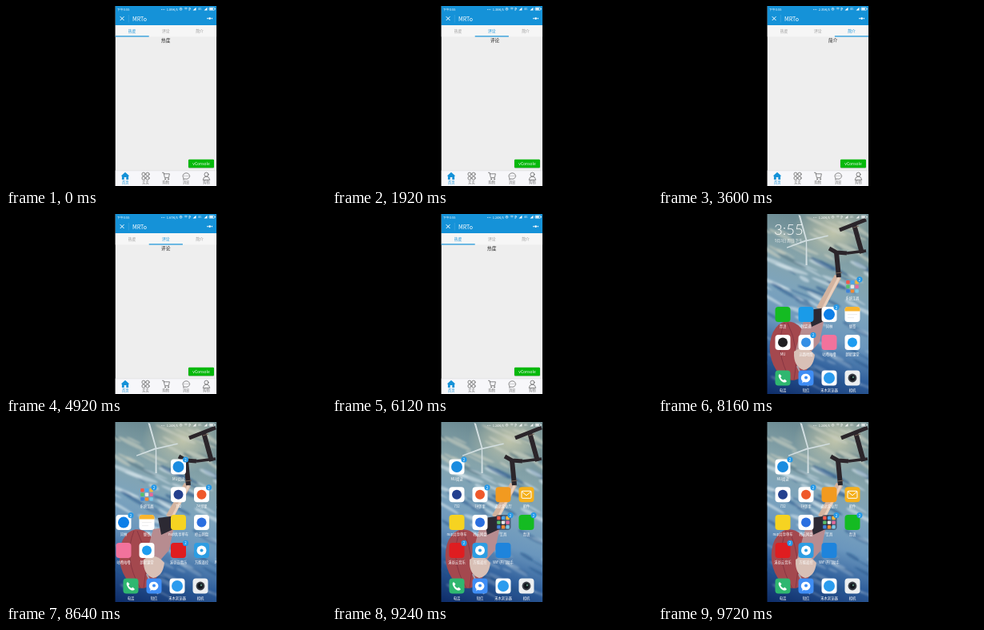
An HTML page that plays this animation: 400x225 px, repeating every 9.84 s.

```html
<!DOCTYPE html>
<html lang="zh">
<head>
<meta charset="utf-8">
<title>Tab swipe demo</title>
<style>
  html, body { margin: 0; width: 100%; height: 100%; overflow: hidden; background: #000; }
  svg { display: block; width: 100vw; height: 100vh; }
  text {
    font-family: "Noto Sans CJK SC", "Noto Sans CJK", "Noto Sans", sans-serif;
    text-anchor: middle; dominant-baseline: central;
  }
  .left { text-anchor: start; }
  .right { text-anchor: end; }
  .tab { font-size: 4.8px; fill: #999; }
  .tab.on, .nav.on { fill: #1592d8; }
  .nav { font-size: 4.2px; fill: #777; }
  .label { font-size: 4.3px; fill: #fff; }
  .line { fill: none; stroke: #555; stroke-width: .7; stroke-linejoin: round; stroke-linecap: round; }
</style>
</head>
<body>
<svg viewBox="0 0 400 225">
  <defs>
    <clipPath id="phone"><rect x="136.5" width="126.7" height="225"/></clipPath>
    <linearGradient id="sky" x1=".2" y1="0" x2="0" y2="1">
      <stop offset="0" stop-color="#6d8c94"/>
      <stop offset=".2" stop-color="#86a4ab"/>
      <stop offset=".4" stop-color="#7da4bd"/>
      <stop offset=".58" stop-color="#6a96bd"/>
      <stop offset=".76" stop-color="#2f5f9c"/>
      <stop offset="1" stop-color="#0c2a66"/>
    </linearGradient>
    <radialGradient id="glow">
      <stop offset="0" stop-color="#ded9b4"/>
      <stop offset="1" stop-color="#ded9b4" stop-opacity="0"/>
    </radialGradient>
    <filter id="soft" x="-30%" y="-30%" width="160%" height="160%"><feGaussianBlur stdDeviation="1"/></filter>
    <g id="status" fill="#fff">
      <path d="M194 4.4h5" stroke="#fff" stroke-width=".7" stroke-dasharray="1 .7"/>
      <g fill="none" stroke="#fff" stroke-width=".6">
        <circle cx="218.5" cy="3.8" r="1.5"/><path d="M218.5 2.8v1.1h.8M222.8 3q2-1.500 4 0M223.700 4.100q1.100-.8 2.200 0M229 2v3.600l2-2.600-2-.6"/>
        <rect x="254" y="2" width="6.6" height="3.3" rx=".6"/>
      </g>
      <path d="M233.5 5.6l4-3.800v3.800zM247.500 5.600l4-3.800v3.800zM254.600 2.600h4.200v2.100h-4.200zM261 3h.8v1.300h-.8z"/>
      <text x="242.3" y="3.8" font-size="3.6">4G</text>
    </g>
  </defs>

  <rect width="400" height="225" fill="#000"/>
  <g clip-path="url(#phone)">
    <g id="home">
      <g id="wall">
        <rect x="130" width="140" height="225" fill="url(#sky)"/>
        <ellipse cx="222" cy="22" rx="52" ry="42" fill="url(#glow)" opacity=".75"/>
        <g id="clouds" filter="url(#soft)"></g>
        <path d="M186.500 64l.4-30h1.200l.6 30zM187 34l-9.500-33 2.500 1 8.600 31.600zM187.500 32.500l27-6 .3 1.300-27 6.500zM187.300 34.200l-24 8.600-.4-1.200 24-9.400z" fill="#d3dfe2"/>
        <ellipse cx="167" cy="171" rx="25" ry="37" fill="#a4484e" transform="rotate(-8 167 171)"/>
        <path d="M160 136q-14 34 8 72M164 136q16 32 8 72" fill="none" stroke="#81323f" stroke-width=".8"/>
        <path d="M204 119L227 78" stroke="#d3b39f" stroke-width="9"/>
        <path d="M209 117L228 80" stroke="#ead0bd" stroke-width="3"/>
        <path d="M184 134l26-4-6 30-14 16-16-6z" fill="#b78c90"/>
        <path d="M190 120l23-3 5 13-24 11z" fill="#2c2933"/>
        <path d="M172 172q14-10 26 4-2 17-14 19-13-4-12-23z" fill="#d8c0b6"/>
        <path d="M176 190q5 12 14 25" fill="none" stroke="#a7a3ae" stroke-width="2"/>
        <g fill="none" stroke="#2b252a" stroke-linejoin="round">
          <path d="M247 13l10 36M225 48l3 31" stroke-width="6"/>
          <path d="M229 20l33-13M216 43l9 5 13 1" stroke-width="5"/>
          <path d="M238 49l24-3" stroke-width="3.500"/>
          <path d="M246 17l7-2M224 74l8-1" stroke="#796558"/>
        </g>
      </g>
      <use href="#status" opacity=".85"/>
      <text class="right" x="214.5" y="3.8" font-size="4" fill="#fff">1.24K/s</text>
      <g id="pages">
        <text class="left" x="145" y="19" font-size="18.5" fill="#fff" style="font-family:Lato,sans-serif;font-weight:300">3:55</text>
        <text class="left" x="146" y="33" font-size="4.6" fill="#fff" opacity=".85">9月3日 周日 下午</text>
      </g>
      <g id="dock"></g>
    </g>

    <g id="app">
      <rect x="136.5" width="126.7" height="225" fill="#eee"/>
      <g id="slides" font-size="5.7" fill="#222"></g>
      <rect x="136.5" width="126.7" height="24" fill="#1592d8"/>
      <use href="#status"/>
      <text class="left" x="139" y="3.8" font-size="3.9" fill="#fff">下午3:55</text>
      <text id="speed" class="right" x="214.5" y="3.8" font-size="4" fill="#fff"></text>
      <path d="M142.7 13.2l4.8 4.8m0-4.800l-4.800 4.800" stroke="#fff"/>
      <path d="M153.3 11v9.5" stroke="#4babdf" stroke-width=".6"/>
      <text class="left" x="158" y="15.5" font-size="7" fill="#fff">MRTo</text>
      <g fill="#fff"><circle cx="252" cy="15.6" r=".8"/><circle cx="254.7" cy="15.6" r="1.4"/><circle cx="257.4" cy="15.6" r=".8"/></g>
      <rect x="136.5" y="24" width="126.7" height="14.4" fill="#f6f6f6"/>
      <g id="tabs"></g>
      <rect id="bar" x="136.5" y="37.3" width="42.2" height="1.2" fill="#1592d8"/>
      <rect x="227.7" y="192" width="32.6" height="11" rx="1.5" opacity=".18"/>
      <rect x="228" y="191.8" width="32" height="10.4" rx="1.2" fill="#04b80a"/>
      <text x="244" y="196.9" font-size="5" fill="#fff">vConsole</text>
      <rect x="136.5" y="205.8" width="126.7" height="19.2" fill="#f7f7fa"/>
      <path d="M136.5 205.8h126.7" stroke="#d4d4d8" stroke-width=".5"/>
      <path d="M149 207.8l5.3 4.6h-1.200v4.600h-2.800v-3h-2.600v3h-2.800v-4.600h-1.200z" fill="#1592d8"/>
      <g class="line">
        <circle cx="172" cy="210.2" r="2.1"/><circle cx="177" cy="210.2" r="2.1"/>
        <circle cx="172" cy="215.1" r="2.1"/><circle cx="177" cy="215.1" r="2.1"/>
        <path d="M195.5 208.3h1.6l1.3 6.3h5l1-4.800h-6.900"/><circle cx="199" cy="216.3" r=".6"/><circle cx="203" cy="216.3" r=".6"/>
        <path d="M221.8 216.6l.2-1.600a4.300 3.800 0 1 1 2 1.200z"/>
        <path d="M223 212.4h.1m2.100 0h.1m2.100 0h.1"/>
        <circle cx="250.5" cy="210.6" r="2.5"/><path d="M246.3 217q.3-3.700 4.200-3.900 3.900.2 4.200 3.900z"/>
      </g>
      <g id="nav"></g>
    </g>
  </g>
</svg>
<script>
const LOOP = 9840, STEP = 120, PAGE = 126.5;
const $ = id => document.getElementById(id);
const add = (id, markup) => $(id).insertAdjacentHTML('beforeend', markup);
const titles = ['热度', '评论', '简介'];

titles.forEach((s, i) => {
  add('tabs', `<text class="tab" x="${157.6 + 42.2 * i}" y="30.8">${s}</text>`);
  add('slides', `<text x="${199.8 + PAGE * i}" y="42.2">${s}</text>`);
});
['首页', '买卖', '购物', '消息', '购物'].forEach((s, i) =>
  add('nav', `<text class="nav${i ? '' : ' on'}" x="${149.2 + 25.3 * i}" y="220.3">${s}</text>`));

// Diagonal cloud streaks: pale and dense above, sparse and blue below
let seed = 11;
const rand = () => (seed = seed * 16807 % 2147483647) / 2147483647;
for (let i = 0; i < 110; i++) {
  const x = 130 + rand() * 140, y = 10 + rand() * 205;
  const dark = rand() < .4;
  const color = dark ? (y < 60 ? '#4f6f7c' : '#245489') : (y < 60 ? '#c9cfc2' : '#d5e4ec');
  const alpha = dark ? .5 : y < 145 ? .6 : .22;
  add('clouds', `<ellipse rx="${6 + rand() * 16}" ry="${.8 + rand() * 2}" fill="${color}" opacity="${alpha}"
    transform="translate(${x} ${y}) rotate(${18 + rand() * 16})"/>`);
}

// Glyphs are drawn around the centre of a tile
const dot = (color, r = 6) => `<circle r="${r}" fill="${color}"/>`;
const folder = () => {
  const colors = ['#f25b4b', '#49a7ee', '#f4b63c', '#56c06b', '#e8e8e8', '#e4689b', '#3f82d8', '#f08a35', '#7cc8e6'];
  return colors.map((c, i) =>
    `<rect x="${i % 3 * 5.6 - 7.8}" y="${(i / 3 | 0) * 5.6 - 7.8}" width="4.4" height="4.4" rx="1" fill="${c}"/>`).join('');
};
const notes = '<path d="M-9.5-4v-2q0-3.5 3.5-3.5h12q3.5 0 3.5 3.5v2z" fill="#f9b52e"/><path d="M-6 0h12m-12 4h8" stroke="#e4e4e4" stroke-width=".7"/>';
const mail = '<rect x="-6" y="-4.5" width="12" height="9" rx="1" fill="none" stroke="#fff"/><path d="M-6-4l6 5 6-5" fill="none" stroke="#fff"/>';
const phone = '<path d="M-4-5q-2 1-1 4 2 5 6 6.5 3 .5 4-1.5l-2.5-2.5-2 1.2q-2.5-1.2-3.3-3.5l1.3-1.7z" fill="#fff"/>';
const chat = '<path d="M-3 4.8l-1.5 1.7v-2.7a5.8 5.3 0 1 1 1.5 1z" fill="#fff"/><circle r="2" cy="-.5" fill="#3f8df5"/>';
const lens = dot('#3a3f47', 5.4) + dot('#10151c', 3.4) + '<circle cx="1" cy="-1" r="1.2" fill="#5b8a78"/>';

function tile(id, x, y, name, color, glyph = '', badge = false) {
  const mark = badge ? '<circle cx="9" cy="-9" r="3.6" fill="#2599e8"/><text x="9" y="-9" font-size="4.5" fill="#fff">2</text>' : '';
  add(id, `<g transform="translate(${x} ${y})">
    <rect x="-9.5" y="-9.5" width="19" height="19" rx="4" fill="${color}"/>${glyph}${mark}
    <text class="label" y="14.7">${name}</text></g>`);
}
const colX = c => 156 + 29 * c;
const rowY = r => 56 + 34.8 * r;
const frost = 'rgba(120,160,195,.4)';

[ // page, column, row, label, tile colour, glyph, badge
  [0, 3, 1, '系统工具', frost, folder(), true],
  [0, 0, 2, '青语', '#14bb22'],
  [0, 1, 2, '钱袋通', '#1a9be8'],
  [0, 2, 2, '问林', '#fff', dot('#0d7fe8', 7), true],
  [0, 3, 2, '便签', '#fff', notes],
  [0, 0, 3, 'MU', '#fff', dot('#201f22')],
  [0, 1, 3, '远路地图', '#fff', dot('#358fe5'), true],
  [0, 2, 3, '咕噜咕噜', '#f2729c'],
  [0, 3, 3, '朗星课堂', '#fff', dot('#1d9cf0')],
  [1, 0, 0, 'MU阅读', '#fff', dot('#1b8ce0', 7), true],
  [1, 0, 1, '732', '#fff', dot('#24408e')],
  [1, 1, 1, '74邻里', '#fff', dot('#ef592b'), true],
  [1, 2, 1, '通达营业厅', '#f29a20'],
  [1, 3, 1, '邮件', '#f5b01c', mail],
  [1, 0, 2, 'nup共享单车', '#f6d321'],
  [1, 1, 2, '岭云网盘', '#fff', dot('#2b6fe0')],
  [1, 2, 2, '工具', 'rgba(45,50,70,.6)', folder(), true],
  [1, 3, 2, '青语', '#14bb22', '', true],
  [1, 0, 3, '溪谷云音乐', '#df1d20', '', true],
  [1, 1, 3, '万能遥控', '#2d9de2', dot('#fff', 6) + dot('#2d9de2', 2)],
  [1, 2, 3, 'WiFi开门助手', '#1e84dc']
].forEach(([p, c, r, ...look]) => tile('pages', colX(c) + PAGE * p, rowY(r), ...look));

[
  ['电话', '#2fb770', phone],
  ['短信', '#3f8df5', chat],
  ['禾木浏览器', '#fff', dot('#2b9cee', 7)],
  ['相机', '#eceff1', lens]
].forEach((look, c) => tile('dock', colX(c), 205, ...look));

const slide = [
  [1200, 0], [1320, .05], [1440, .2], [1560, .42], [1680, .82], [1800, .94], [2040, 1],
  [2280, 1], [2400, 1.03], [2520, 1.15], [2640, 1.4], [2760, 1.85], [2880, 1.96], [3120, 2],
  [3240, 1.95], [3360, 1.865], [3480, 1.865], [3600, 1.85],
  [3960, 1.85], [4080, 1.75], [4200, 1.58], [4320, 1.3], [4440, 1.1], [4560, 1.03], [4800, 1],
  [5040, 1], [5160, .97], [5280, .85], [5400, .62], [5520, .25], [5640, .08], [5880, 0]
];
const under = [
  [1560, 0], [1680, .3], [1800, .8], [1920, 1], [2640, 1], [2760, 1.3], [2880, 1.8], [3000, 2],
  [4200, 2], [4320, 1.7], [4440, 1.2], [4560, 1], [5400, 1], [5520, .7], [5640, .2], [5760, 0]
];
const fade = [[7680, 1], [7800, .9], [7920, .55], [8040, .2], [8160, 0]];
const shrink = [[7680, 1], [7800, .94], [8160, .5]];
const swipe = [[8520, 0], [8640, 67], [8760, 105], [8880, 119], [9000, 125], [9120, PAGE]];
const drift = [[8160, -2], [8640, 0]];

function at(keys, t) {
  const i = keys.findIndex(k => k[0] > t);
  if (i < 0) return keys[keys.length - 1][1];
  if (!i) return keys[0][1];
  const [[t0, a], [t1, b]] = [keys[i - 1], keys[i]];
  return a + (b - a) * (t - t0) / (t1 - t0);
}
const speeds = [[0, '1.89'], [1440, '1.38'], [2880, '2.35'], [4440, '1.67'], [5760, '1.24']];
const move = (id, x) => $(id).setAttribute('transform', `translate(${x} 0)`);

function draw(now) {
  const t = Math.floor(now % LOOP / STEP) * STEP;
  const tab = at(under, t), scale = at(shrink, t), alpha = at(fade, t);
  move('slides', -PAGE * at(slide, t));
  move('bar', 42.2 * tab);
  move('pages', -at(swipe, t));
  move('wall', at(drift, t));
  [...$('tabs').children].forEach((el, i) => el.classList.toggle('on', i === Math.round(tab)));
  $('speed').textContent = speeds.filter(s => s[0] <= t).pop()[1] + 'K/s';
  $('app').setAttribute('transform', `translate(200 112.5) scale(${scale}) translate(-200 -112.5)`);
  $('app').setAttribute('opacity', alpha);
  $('home').setAttribute('visibility', alpha < 1 ? 'visible' : 'hidden');
  requestAnimationFrame(() => draw(performance.now() - start));
}
const start = performance.now();
draw(0);
</script>
</body>
</html>
```
